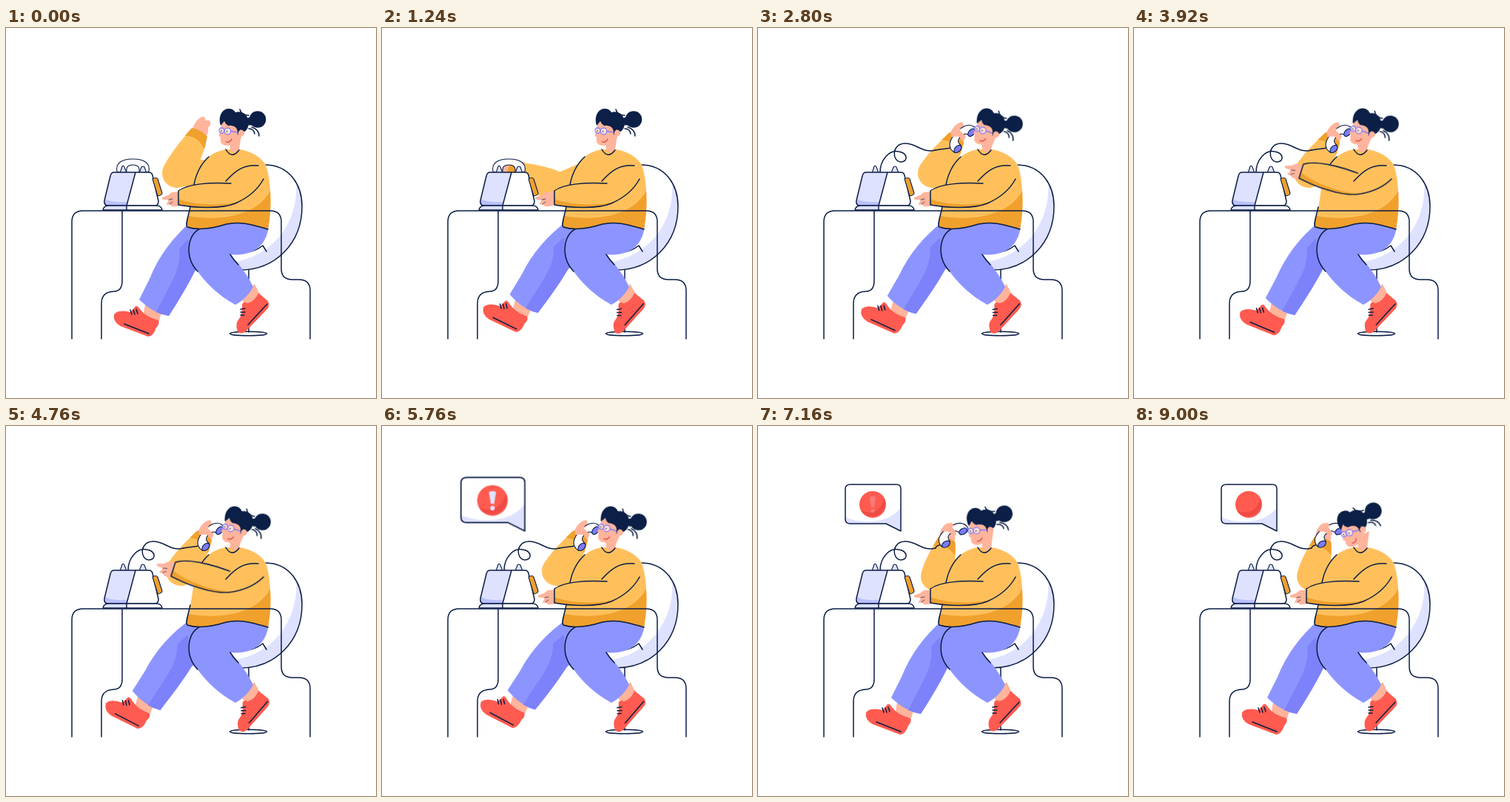
Recreate the animation shown at these times as an HTML page. Size 500 by 500 pixels, loop 9040 ms.

```html
<!DOCTYPE html>
<html lang="en">
<head>
<meta charset="utf-8">
<title>Phone call at the desk</title>
<style>
  html, body { margin: 0; width: 100%; height: 100%; overflow: hidden; background: #fff; }
  svg { display: block; width: 100vw; height: 100vh; }
  .ink { fill: none; stroke: #0b1d45; stroke-width: 1.5; stroke-linecap: round; stroke-linejoin: round; }
  .thin { stroke-width: 1.1; }
  .white { fill: #fff; }
  .pale { fill: #dfe2ff; }
  .shade { fill: #b9c0ff; }
  .violet { fill: #7c7bf5; }
  .skin { fill: #ffb49c; }
  .wool { fill: #ffc05c; }
  .amber { fill: #f0a02c; }
  .pants { fill: #8c95ff; }
  .fold { fill: #7d82fa; }
  .red { fill: #ff5b50; }
  .hair { fill: #0b1f47; }
  .lens { fill: #fff; fill-opacity: .55; stroke: #7f7dfb; stroke-width: 1.3; }
  .moving { animation: 9040ms infinite ease-in-out; }
  #head { transform-origin: 308px 164px; animation-name: head; }
  #arm { transform-origin: 348px 204px; animation-name: arm; }
  #hand { animation-name: hand; }
  #bubble { transform-origin: 193px 142px; animation-name: bubble; }
  @keyframes head {
    0%, 14.4% { transform: rotate(0deg); }
    22.7% { transform: rotate(13deg); }
    27.7%, 65.3% { transform: rotate(10deg); }
    71.9% { transform: rotate(13deg); }
    84.1%, 100% { transform: rotate(-21deg); }
  }
  @keyframes arm {
    0%, 36%, 58%, 100% { transform: none; }
    41.5%, 52.5% { transform: rotate(17.4deg) scale(1.04); }
  }
  @keyframes hand {
    0%, 21%, 100% { transform: none; }
    10%, 15.5% { transform: translateX(-4px); }
  }
  @keyframes bubble {
    0%, 59.3% { transform: scale(0); animation-timing-function: ease-out; }
    63.7% { transform: scale(1.15); }
    67% { transform: scale(.96); }
    70.2% { transform: scale(1.02); }
    73.5%, 100% { transform: scale(1); }
  }
</style>
</head>
<body>
<svg viewBox="0 0 500 500">
  <!-- chair -->
  <path class="white" d="M350 185C384 185 400 213 400 241C400 291 364 327 316 327L300 300Z"/>
  <path class="pale" d="M392 207C398 217 400 229 400 241C400 291 364 327 316 327L309 316C360 308 396 264 392 207Z"/>
  <path class="ink" d="M350 185C384 185 400 213 400 241C400 291 364 327 316 327Q311 325 309 318M328 327V411M315 304Q335 304 347 294L352 302"/>
  <ellipse class="ink" cx="327.500" cy="413" rx="25" ry="2.800"/>

  <!-- reaching arm -->
  <path id="upper" fill="none" stroke="#ffc05c" stroke-width="36" stroke-linecap="round"/>
  <g id="fore">
    <path id="palm" class="skin" d="M-4-10C6-12 14-12 20-7Q23-4 18-1L20 3Q21 7 15 8L11 7Q5 12-4 10Z"/>
    <path id="sleeve" class="wool"/>
    <path id="cuff" class="amber" d="M0-12L-14-15Q-5 0-17 17L0 12Q4 0 0-12Z"/>
  </g>

  <!-- telephone -->
  <g id="cord">
    <path class="ink" vector-effect="non-scaling-stroke" d="M165 195C165 178 178 164 190 167C203 169 203 181 193 181C181 180 180 157 198 156C214 155 222 170 240 165"/>
  </g>
  <path id="tail" class="ink"/>
  <g id="handset">
    <path class="ink thin" style="fill:#fff" d="M-21.500 4C-24-8-14-13 0-13C14-13 24-8 21.500 4Q15 7 8.500 4C9-3 6-5 0-5C-6-5-9-3-8.500 4Q-15 7-21.500 4Z"/>
    <g id="grip">
      <ellipse class="violet ink thin" style="fill:#7c7bf5" cx="-15" cy="4" rx="6" ry="3.800"/>
      <ellipse class="violet ink thin" style="fill:#7c7bf5" cx="14" cy="2" rx="6" ry="3.800"/>
      <path class="skin" d="M-9-13Q-7-19 0-18Q8-18 8-13L5-11V-2Q4 2 0 0L-3-8Z"/>
    </g>
  </g>
  <path class="pale ink thin" style="fill:#dfe2ff" d="M154 196L157 187Q159 185 160 188L163 196M180 196L183 188Q185 186 187 188L190 196"/>
  <path class="white" d="M175 195H193Q197 195 198 199L206 234Q206 240 201 240H163Z"/>
  <path class="pale" d="M146 195H175L163 240H137Q132 239 133 233L141 200Q142 195 146 195Z"/>
  <path class="shade" d="M134 231Q140 236 164 235L163 240H137Q132 239 134 231Z"/>
  <path class="ink" d="M146 195H193Q197 195 198 199L206 234Q206 240 201 240H137Q132 239 133 233L141 200Q142 195 146 195ZM175 195L163 240"/>
  <path class="pale" d="M131 246Q132 240 139 240H163V246Z"/>
  <path class="white" d="M163 240H203Q210 240 211 246H163Z"/>
  <path class="ink" d="M131 246Q132 240 139 240H203Q210 240 211 246ZM163 240V246"/>
  <path class="ink thin" style="fill:#f0a02c" d="M198 204Q203 201 205 204L211 223Q211 226 205 227Z"/>

  <!-- far leg -->
  <g id="leg">
    <path class="skin" d="M188 374L211 382L206 398L185 390Z"/>
    <path class="red" d="M175 376Q178 375 181 380Q188 390 206 395Q208 400 203 405Q199 417 192 417L155 403Q144 397 146 387Q152 380 168 384Q172 380 175 376Z"/>
    <path class="ink" d="M160 400L193 413M168 381L170 387M172 381L174 387M176 380L178 386"/>
    <path class="pants" d="M250 262C225 283 206 309 194 339L180 367Q198 385 220 389C234 367 245 349 256 327L275 310V262Z"/>
    <path class="fold" d="M234 298C238 325 222 345 203 384Q211 388 220 389C234 367 245 349 256 327L262 312L247 284Z"/>
  </g>

  <!-- near leg -->
  <g id="foot">
    <path class="skin" d="M316 364L336 346L344 362L326 376Z"/>
    <path class="red" d="M341 358L354 369Q358 376 351 382L324 410Q317 415 313 410Q309 399 315 393Q320 387 319 374Q321 368 326 372Q337 369 341 358Z"/>
    <path class="ink" d="M353 373L327 401M317 380L323 379M317 384L323 384M317 388L322 388"/>
  </g>
  <path class="pants" d="M250 258C243 285 246 314 259 329C270 345 288 362 310 374Q325 366 334 350C327 334 314 318 303 306C330 309 355 297 355 262Z"/>
  <path class="ink" d="M264 270C243 280 242 311 259 329M303 306Q308 314 314 320"/>

  <!-- body -->
  <path class="wool" d="M297 164C280 167 265 177 257 198C252 214 252 236 246 255Q243 266 245 269C260 274 282 270 298 265C320 260 338 268 354 272C358 250 360 211 351 185C344 174 332 167 316 164Z"/>
  <path class="amber" d="M247 254C286 261 338 256 357 220Q359 247 354 272C338 268 320 260 298 265C282 270 260 274 245 269Q243 264 247 254Z"/>
  <path class="ink" d="M254 212C257 196 263 184 274 174M249 242C246 256 242 266 245 269C260 274 282 270 298 265C320 260 338 268 354 272"/>
  <path class="skin" d="M302 150L303 165Q309 171 315 164L318 142Z"/>
  <path class="ink" d="M297 164Q305 178 315 165"/>

  <!-- desk -->
  <path class="ink" d="M89 420V262Q89 247 104 247H357Q372 247 372 262V325Q372 340 387 340H396Q411 340 411 355V420M157 247V342Q157 356 145 356Q129 357 129 372V420"/>

  <!-- head -->
  <g id="head" class="moving">
    <path class="ink" d="M316 110Q318 118 328 118M328 136Q335 136 336 143M332 134Q342 137 342 146"/>
    <path class="skin" d="M292 128L288 144Q287 147 290 147C288 156 294 161 303 158L315 160L320 138L312 124Z"/>
    <path class="hair" d="M290 132C286 120 292 109 301 109Q307 109 310 114C320 111 328 119 328 128Q328 137 321 141L317 137L313 145C314 135 309 131 300 132Q296 129 295 126Z"/>
    <circle class="hair" cx="340" cy="123.500" r="11.300"/>
    <circle class="hair" cx="330" cy="126" r="5.500"/>
    <circle class="skin" cx="318" cy="142" r="4.200"/>
    <circle class="lens" cx="291.500" cy="138.500" r="3.500"/>
    <circle class="lens" cx="299.500" cy="139.500" r="4.400"/>
    <path d="M304 139.500L313 141" fill="none" stroke="#7f7dfb" stroke-width="1.500"/>
    <circle class="hair" cx="291" cy="139" r=".8"/>
    <circle class="hair" cx="298.500" cy="140" r=".8"/>
    <path d="M298 154Q303 155 305 150" fill="none" stroke="#d9453f" stroke-width="1.300" stroke-linecap="round"/>
  </g>

  <!-- near arm -->
  <g id="arm" class="moving">
    <g id="hand" class="moving">
      <path class="skin" d="M237 221L224 222L219 226L211 229Q210 232 214 232H220L217 238Q218 240 221 238L224 241Q230 242 237 239Z"/>
      <path class="ink" style="stroke-width:.7" d="M220 232L225 231M221 238L225 235"/>
    </g>
    <path class="wool" d="M304 210C275 208 245 211 233 220V239C255 243 290 245 310 237C328 229 340 219 348 204Z"/>
    <path class="amber" d="M233 231C252 239 288 241 314 235L310 237C290 245 255 243 233 239Z"/>
    <path class="ink" d="M304 210C275 208 245 211 233 220V239C255 243 290 245 310 237C328 229 340 219 348 204"/>
  </g>
  <path class="ink" d="M297 207C309 194 320 184 341 186"/>

  <!-- alert -->
  <g id="bubble" class="moving">
    <path class="white" d="M125 79H187Q193 79 193 85V142L173 132H125Q118 132 118 126V85Q118 79 125 79Z"/>
    <path class="pale" d="M118 123C142 134 179 131 193 110V142L173 132H125Q118 132 118 126Z"/>
    <path class="ink" d="M125 79H187Q193 79 193 85V142L173 132H125Q118 132 118 126V85Q118 79 125 79Z"/>
    <circle class="red" cx="155" cy="106" r="18"/>
    <path d="M171 98A18 18 0 0 1 139 114Q162 124 171 98Z" fill="#ef4a43"/>
    <g id="mark" class="pale">
      <path d="M151 97Q151 95 155 95Q159 95 159 97L157 110H153Z"/>
      <circle cx="155" cy="115" r="2.700"/>
    </g>
  </g>
</svg>
<script>
  const LOOP = 9040, TAP = 1033, TAP_START = 960, TAPS = 7;
  const $ = id => document.getElementById(id);
  const move = (id, value) => $(id).setAttribute('transform', value);
  const draw = (id, path) => $(id).setAttribute('d', path);

  // 0 before a, 1 after b, eased between
  function step(t, a, b) {
    const x = Math.min(1, Math.max(0, (t - a) / (b - a)));
    return x * x * (3 - 2 * x);
  }

  function drawCall(t) {
    const out = step(t, 0, 800), back = step(t, 800, 1180);
    const lift = step(t, 1400, 2300), lean = step(t, 6400, 7160);

    const ex = 231 + 7 * out - 2 * lift + 4 * lean;
    const ey = 196 + 19 * out - 19 * lift + 7 * lean;
    const angle = -61 - 103 * out + 3 * back + 105 * lift - 17 * lean;
    const len = 63 + 42 * out - 35 * back - 12 * lift - 6 * lean;
    draw('upper', `M${ex} ${ey}L282 196`);
    move('fore', `translate(${ex} ${ey}) rotate(${angle})`);
    move('palm', `translate(${len})`);
    move('cuff', `translate(${len})`);
    draw('sleeve', `M${len} -11C${len * .6} -18 ${len * .25} -20 0 -20A20 20 0 0 0 0 20C${len * .25} 22 ${len * .7} 19 ${len} 11Z`);

    // the handset rests in its cradle until it is lifted, then follows the forearm
    const dir = (angle + 1.4 + 6.6 * lift - lean) * Math.PI / 180;
    const reach = 71 - 9 * lift - 2 * lean;
    const hx = lift ? ex + reach * Math.cos(dir) : 171.5;
    const hy = lift ? ey + reach * Math.sin(dir) : 190;
    move('handset', `translate(${hx} ${hy}) rotate(${-46 * lift + 13 * lean})`);
    $('grip').style.display = lift ? '' : 'none';

    // the cord unrolls from its socket at 165, 195
    const show = lift ? '' : 'none';
    $('cord').style.display = $('tail').style.display = show;
    move('cord', `translate(165 195) scale(${lift}) translate(-165 -195)`);
    draw('tail', `M${165 + 75 * lift} ${195 - 30 * lift}Q${hx - 24} ${hy + 13} ${hx - 15} ${hy + 12}`);
  }

  function drawTaps(t) {
    const beat = (t - TAP_START) / TAP;
    const swing = beat > 0 && beat < TAPS ? Math.sin(Math.PI * beat) ** 2 : 0;
    move('leg', `rotate(${8 * swing} 265 270)`);
    move('foot', `rotate(${-3 * swing} 336 360)`);
  }

  function drawMark(t) {
    $('mark').style.opacity = .5 + .5 * Math.cos(2 * Math.PI * Math.max(0, t - 6500) / 1000);
  }

  function frame() {
    const t = performance.now() % LOOP;
    drawCall(t);
    drawTaps(t);
    drawMark(t);
    requestAnimationFrame(frame);
  }
  frame();
</script>
</body>
</html>
```
